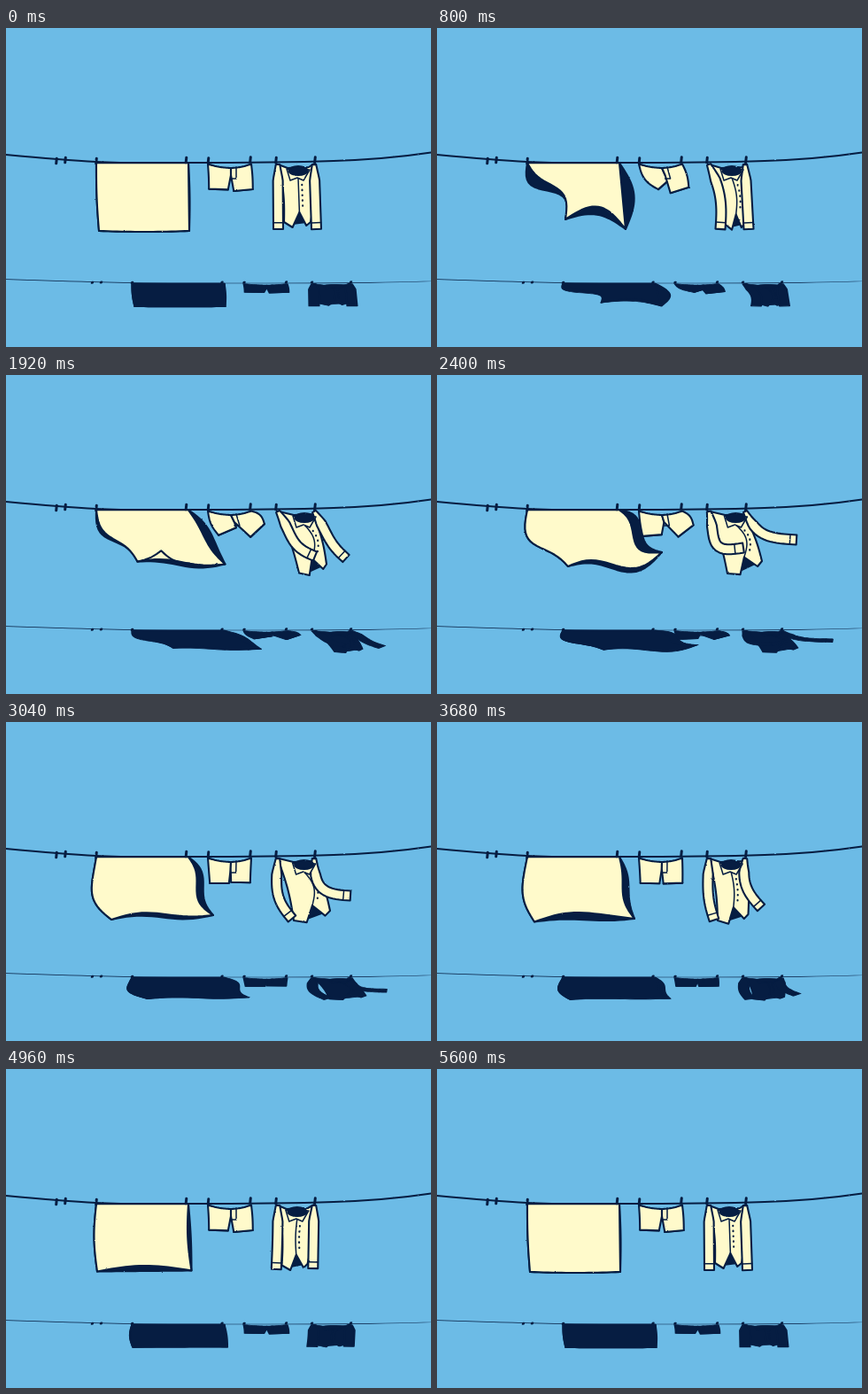
Animation, 480 px wide and 360 px high, one loop 6.72 s. Source, as an HTML page:

```html
<!DOCTYPE html>
<html lang="en">
<head>
<meta charset="utf-8">
<title>Washing line</title>
<style>
  html, body { margin: 0; width: 100%; height: 100%; overflow: hidden; background: #6cbbe6; }
  svg { display: block; width: 100%; height: 100%; }
  #line { stroke: #061d42; stroke-width: 2.1; stroke-linejoin: round; stroke-linecap: round; }
  .cloth { fill: var(--cloth, #fffacb); }
  .dark { fill: #061d42; }
  .ink { fill: none; }
  .fine { stroke-width: 1.5; }
  .peg { stroke-width: 3; }
</style>
</head>
<body>
<svg viewBox="0 0 480 360">
  <filter id="rough" filterUnits="userSpaceOnUse" x="0" y="0" width="480" height="360" color-interpolation-filters="sRGB">
    <feTurbulence type="fractalNoise" baseFrequency=".25" numOctaves="2" seed="4" result="noise"/>
    <feDisplacementMap in="SourceGraphic" in2="noise" scale="1.6" xChannelSelector="R" yChannelSelector="G"/>
  </filter>
  <use href="#line" transform="matrix(1 0 0 .346 40.5 235.4)" style="--cloth:#061d42"/>
  <g filter="url(#rough)"><g id="line"></g></g>
</svg>
<script>
const STEP = 160, LOOP = 6720, REST = 5600;
const keyTimes = [0, 800, 1440, 2400, 3040, 4320, REST];

// One wind pose per key time; the loop returns to the first.
// Sheet edges are [bow, wave, width of the dark flap]; the hem also has a fold height.
const sheetPoses = [
  { corners: [[105, 229], [207, 229]], left: [1, 0, 0], right: [0, 0, -1], hem: [1, 0, 0, 0] },
  { corners: [[145, 216], [213, 227]], left: [-10, 6, 9], right: [0, 0, -13], hem: [-20, 0, 9, 0] },
  { corners: [[149, 205], [241, 227]], left: [-4, 3, 5], right: [-6, 4, -5], hem: [-9, 3, 3, 14] },
  { corners: [[148, 216], [254, 200]], left: [15, 6, 0], right: [11, -7, -12], hem: [7, -8, 5, 0] },
  { corners: [[119, 223], [234, 218]], left: [14, -2, 0], right: [5, -5, -8], hem: [-4, -3, 4, 0] },
  { corners: [[101, 228], [212, 226]], left: [5, 0, 0], right: [5, 0, -6], hem: [-13, 0, 12, 0] }
];
// Middle of each trouser hem.
const shortsPoses = [
  [[240, 182], [268, 183]], [[258, 175], [274, 183]], [[257, 172], [287, 175]],
  [[243, 181], [281, 176]], [[241, 182], [265, 181]], [[240, 182], [268, 183]]
];
// Sleeves are [wrist, bow, wave]; tails are the lower corners of the shirt.
const shirtPoses = [
  { left: [[307.5, 227], 0, 0], right: [[350.5, 227], 0, 0], tails: [[314, 219], [344, 219]] },
  { left: [[320, 227], -6, 0], right: [[352, 227], 0, 0], tails: [[326, 222], [347, 221]] },
  { left: [[352, 214], -4, 0], right: [[362, 228], -6, -3], tails: [[334, 223], [357, 217]] },
  { left: [[346, 195], 18, -4], right: [[406, 186], 12, 1], tails: [[328, 224], [367, 210]] },
  { left: [[323, 222], 9, -1], right: [[389, 196], 17, 0], tails: [[325, 224], [366, 213]] },
  { left: [[303, 225], -1, 0], right: [[343, 223], 0, 0], tails: [[309, 224], [337, 221]] }
];

// Blends numbers, and arrays or objects of them.
function mix(a, b, t) {
  if (typeof a === 'number') return a + (b - a) * t;
  if (Array.isArray(a)) return a.map((v, i) => mix(v, b[i], t));
  return Object.fromEntries(Object.keys(a).map(k => [k, mix(a[k], b[k], t)]));
}
const shift = ([x, y], dx, dy) => [x + dx, y + dy];

// Unit normal: 90 degrees clockwise on screen from the direction p to q.
function normal(p, q) {
  const dx = q[0] - p[0], dy = q[1] - p[1], length = Math.hypot(dx, dy) || 1;
  return [-dy / length, dx / length];
}
const push = (p, n, amount) => shift(p, n[0] * amount, n[1] * amount);

// A line from p to q, bent into an arc plus an S-shaped wave.
function bent(p, q, bow = 0, wave = 0, steps = 20) {
  const n = normal(p, q);
  return Array.from({ length: steps + 1 }, (_, i) => {
    const t = i / steps;
    return push(mix(p, q, t), n, bow * Math.sin(Math.PI * t) + wave * Math.sin(2 * Math.PI * t));
  });
}

const lines = pts => 'M' + pts.map(p => p.map(v => v.toFixed(2))).join('L');
const path = (kind, d) => `<path class="${kind}" d="${d}"/>`;
const shape = (kind, ...pts) => path(kind, lines(pts) + 'Z');
const stroke = (kind, ...pts) => path(kind, lines(pts));

const rope = path('ink', 'M-60 138L0 143Q65 149 102 151T203 152Q310 152 370 150T480 140.5L540 133');
const pegs = [[57, 150], [67, 149], [102, 150], [203.5, 149], [228.5, 149.5], [276, 148.5], [305, 149], [349, 148.5]]
  .map(([x, y]) => path('peg', `M${x + .3} ${y - 2.8}l-.6 5.6`)).join('');

function drawSheet({ corners: [bottomLeft, bottomRight], left, right, hem }) {
  const topLeft = [102, 152.3], topRight = [206, 152.3];
  const outline = (kind, flap) => shape(kind,
    ...bent(topRight, bottomRight, right[0] + flap * right[2], right[1]),
    ...bent(bottomLeft, bottomRight, hem[0] + flap * hem[2], hem[1]).reverse(),
    ...bent(topLeft, bottomLeft, left[0] + flap * left[2], left[1] + flap * left[2] * .65).reverse());
  const hemLine = bent(bottomLeft, bottomRight, hem[0], hem[1]);
  const peak = shift(mix(bottomLeft, bottomRight, .27), 0, -hem[3] - 6);
  const fold = hem[3] > 2 ? stroke('ink',
    ...bent(bottomLeft, peak, 2), ...bent(peak, hemLine[12], 4)) : '';
  return outline('dark', 1) + outline('cloth', 0) + fold;
}

function drawShorts([leftHem, rightHem]) {
  const left = [228, 153.5], middle = [254, 158], right = [277, 153.5];
  const sway = (leftHem[0] + rightHem[0]) / 2 - 254;
  const crotch = shift(middle, sway * .3, 8);
  const leg = (a, b, hem, bowA, bowB, inner) => {
    const waist = mix(a, b, .5), n = normal(waist, hem), lean = hem[0] - waist[0];
    const outerA = push(hem, n, 10.8), outerB = push(hem, n, -10.8);
    const opening = bent(outerA, outerB, -Math.max(0, lean) * .25);
    const sideA = inner === 'left' ? [crotch, outerA] : bent(a, outerA, lean * bowA);
    const sideB = inner === 'right' ? [crotch, outerB] : bent(b, outerB, lean * bowB);
    return shape('dark', ...opening) +
      shape('cloth', ...bent(a, b, 1), ...sideB, ...sideA.reverse());
  };
  return leg(left, middle, leftHem, .3, 0, 'right') +
    leg(middle, right, rightHem, 0, -.2, 'left') +
    stroke('ink fine', shift(middle, 6, -1), shift(crotch, 6, 4), shift(crotch, 0, 4));
}

function drawSleeve(shoulder, [wrist, bow, wave]) {
  const centre = bent(shoulder, wrist, bow, wave), last = centre.length - 1;
  const side = sign => centre.map((p, i) => push(p,
    normal(centre[Math.max(0, i - 1)], centre[Math.min(last, i + 1)]),
    sign * 5.5 * Math.min(1, .4 + i / 8)));
  const outer = side(1), inner = side(-1), cuff = last - 2;
  return shape('cloth', ...outer, ...inner.slice().reverse()) +
    stroke('ink fine', outer[cuff], inner[cuff]);
}

function drawShirt({ left, right, tails: [tailLeft, tailRight] }) {
  const lean = (tailLeft[0] + tailRight[0]) / 2 - 329;
  const throat = [330 + lean * .4, 161], [x, y] = throat;
  const down = normal(tailLeft, tailRight);
  const hemPoint = (t, drop) => push(mix(tailLeft, tailRight, t), down, drop);
  const notch = hemPoint(.58, -11), tipLeft = hemPoint(.32, 6), tipRight = hemPoint(.84, 4);
  const strip = bent(shift(throat, 0, 8), notch, -lean * .4);
  const buttons = [4, 7, 10, 13, 16].map(i => lines([shift(strip[i], 4, 0), shift(strip[i], 4, .5)])).join('');
  const collar = [[-13, -2], [-9, 11], [-1, 8], [6, 11], [13, -1]].map(([dx, dy]) => shift(throat, dx, dy));
  return shape('dark', notch, mix(notch, tipLeft, .75), mix(notch, tipRight, .75)) +
    shape('cloth', [306, 153.5], shift(throat, -12, -3), shift(throat, 12, -4), [348, 153],
      ...bent([348, 160], tailRight, -2), tipRight, notch, tipLeft,
      ...bent([309, 160], tailLeft, -2).reverse()) +
    stroke('ink fine', ...strip) + path('ink', buttons) +
    drawSleeve([307, 154], left) + drawSleeve([348, 154], right) +
    shape('cloth fine', ...collar) +
    `<ellipse class="dark" cx="${x}" cy="${y}" rx="10.5" ry="5"/>`;
}

function draw(time) {
  const key = Math.max(0, keyTimes.findIndex(t => t >= time) - 1);
  const u = (time - keyTimes[key]) / (keyTimes[key + 1] - keyTimes[key]);
  const ease = u * u * (3 - 2 * u);
  const pose = poses => mix(poses[key], poses[(key + 1) % poses.length], ease);
  document.getElementById('line').innerHTML = rope +
    drawSheet(pose(sheetPoses)) + drawShorts(pose(shortsPoses)) + drawShirt(pose(shirtPoses)) + pegs;
}

const start = performance.now();
let shown = -1;
function tick() {
  const elapsed = (performance.now() - start) % LOOP;
  const time = Math.min(Math.floor(elapsed / STEP) * STEP, REST);
  if (time !== shown) draw(shown = time);
  requestAnimationFrame(tick);
}
tick();
</script>
</body>
</html>
```
